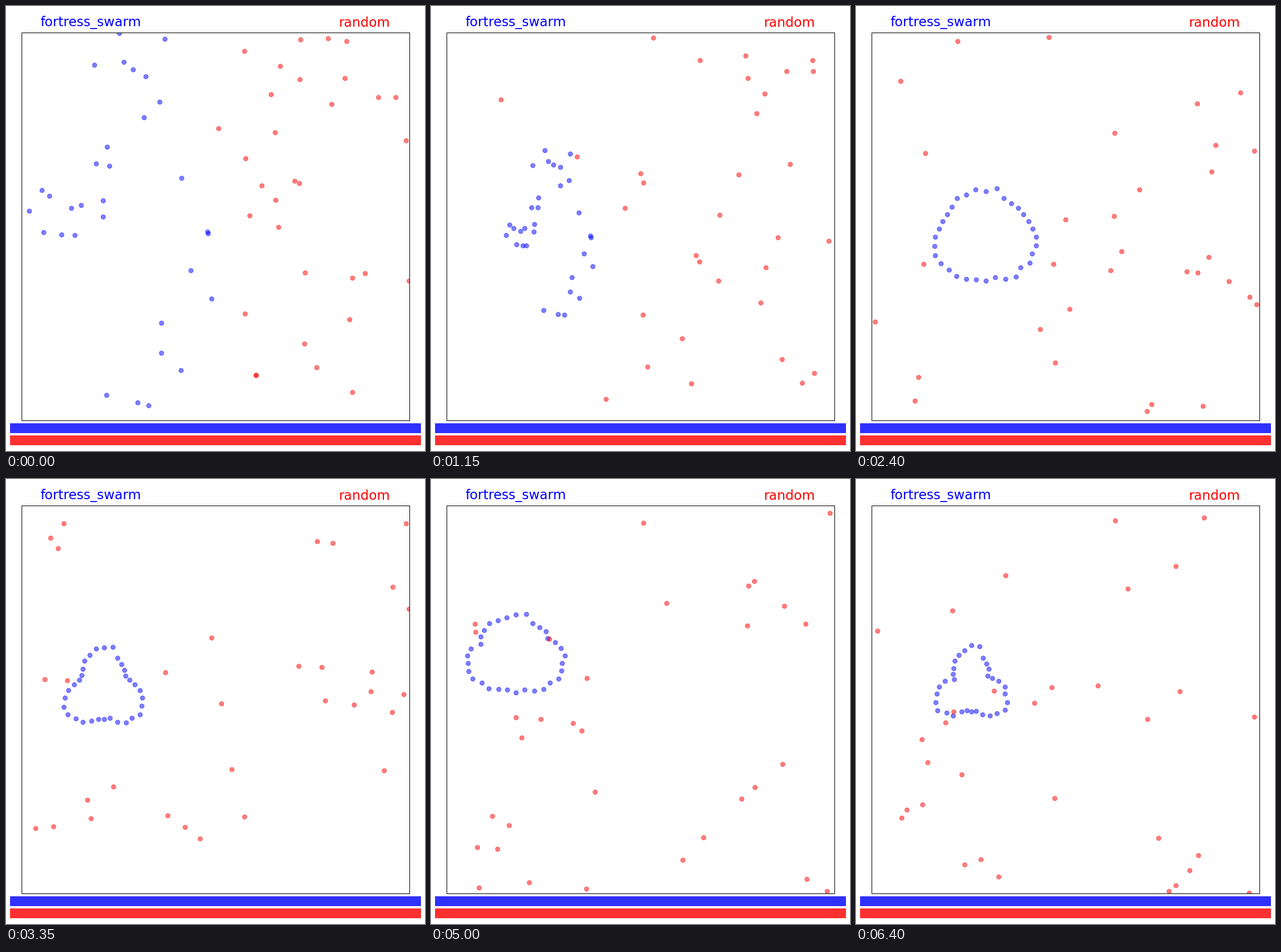
These frames come from a looping animation (726 by 771 pixels, 6.45 s). A matplotlib script:

```python
import numpy as np
import matplotlib.pyplot as plt
from matplotlib.animation import FuncAnimation
from matplotlib.patches import Rectangle

W, H, DPI = 726, 771, 100
FRAMES, STEP = 129, 50
LEFT, TOP, SIZE = 27, 46, 672
RIGHT, BOTTOM = LEFT + SIZE, TOP + SIZE
COUNT = 32
HOME = np.array([200, 412])
rng = np.random.default_rng(11)


def scatter(x0, x1):
    """Random places in a full-height strip of the field."""
    return rng.uniform((x0, TOP), (x1, BOTTOM), (COUNT, 2))


# Red: steady speed, wandering heading, wrapping at the edges
SPEED, TURN = 6, 0.3
heading = (rng.uniform(0, 2 * np.pi, COUNT)
           + np.cumsum(rng.normal(0, TURN, (FRAMES, COUNT)), axis=0))
steps = SPEED * np.stack([np.cos(heading), np.sin(heading)], axis=-1)
steps[0] = 0
walk = scatter(LEFT + SIZE / 2, RIGHT) + np.cumsum(steps, axis=0)
corner = np.array([LEFT, TOP])
walk = corner + (walk - corner) % SIZE

# Blue: dots gather from the left half into a drifting, pulsing ring
start = scatter(LEFT, LEFT + SIZE / 2)
dx, dy = (start - HOME).T
start = start[np.argsort(np.arctan2(dy, dx) % (2 * np.pi))]
angle = 2 * np.pi * np.arange(COUNT) / COUNT
rough = rng.normal(1, 0.06, COUNT)
rough_late = rng.normal(1, 0.06, COUNT)

# time, centre x, centre y, radius x, radius y, depth of the three lobes
RING = np.array([
    (48, 225, 400, 88, 78, 0.06),
    (67, 170, 366, 62, 62, 0.22),
    (81, 158, 346, 46, 28, 0.30),
    (100, 147, 306, 82, 66, 0.08),
    (128, 200, 360, 54, 56, 0.28),
])


def ring_at(n):
    cx, cy, rx, ry, lobe = (np.interp(n, RING[:, 0], col)
                            for col in RING.T[1:])
    mix = n / (FRAMES - 1)
    r = 1 + lobe * np.cos(3 * (angle - np.pi / 6))
    r = r * (rough * (1 - mix) + rough_late * mix)
    return np.column_stack([cx + rx * r * np.cos(angle),
                            cy + ry * r * np.sin(angle)])


def swarm_at(n):
    shrink = np.interp(n, [0, 23], [1, 0.48])
    u = np.clip((n - 15) / 33, 0, 1)
    join = u * u * (3 - 2 * u)
    crowd = HOME + (start - HOME) * shrink
    return crowd * (1 - join) + ring_at(n) * join


fig = plt.figure(figsize=(W / DPI, H / DPI), dpi=DPI, facecolor="white")
page = fig.add_axes([0, 0, 1, 1], xlim=(0, W), ylim=(H, 0))
page.axis("off")
for x, y, label, color in ((147, 35, "fortress_swarm", "blue"),
                           (621, 36, "random", "red")):
    page.text(x, y, label, color=color, fontsize=16.5, ha="center",
              va="baseline", family="DejaVu Sans")
for y, color in ((723, "blue"), (744, "red")):
    page.add_patch(Rectangle((7, y), 712, 17, color=color, alpha=0.81, lw=0))

field = fig.add_axes([LEFT / W, 1 - BOTTOM / H, SIZE / W, SIZE / H],
                     xlim=(LEFT, RIGHT), ylim=(BOTTOM, TOP),
                     xticks=[], yticks=[])
for spine in field.spines.values():
    spine.set_linewidth(0.72)
blue, red = (field.plot([], [], "o", color=c, alpha=0.5, ms=5.5, mew=0.72)[0]
             for c in ("blue", "red"))


def draw(n):
    blue.set_data(*swarm_at(n).T)
    red.set_data(*walk[n].T)
    return blue, red


anim = FuncAnimation(fig, draw, frames=FRAMES, interval=STEP,
                     init_func=lambda: draw(0), repeat=True, repeat_delay=0)
plt.show()
```
